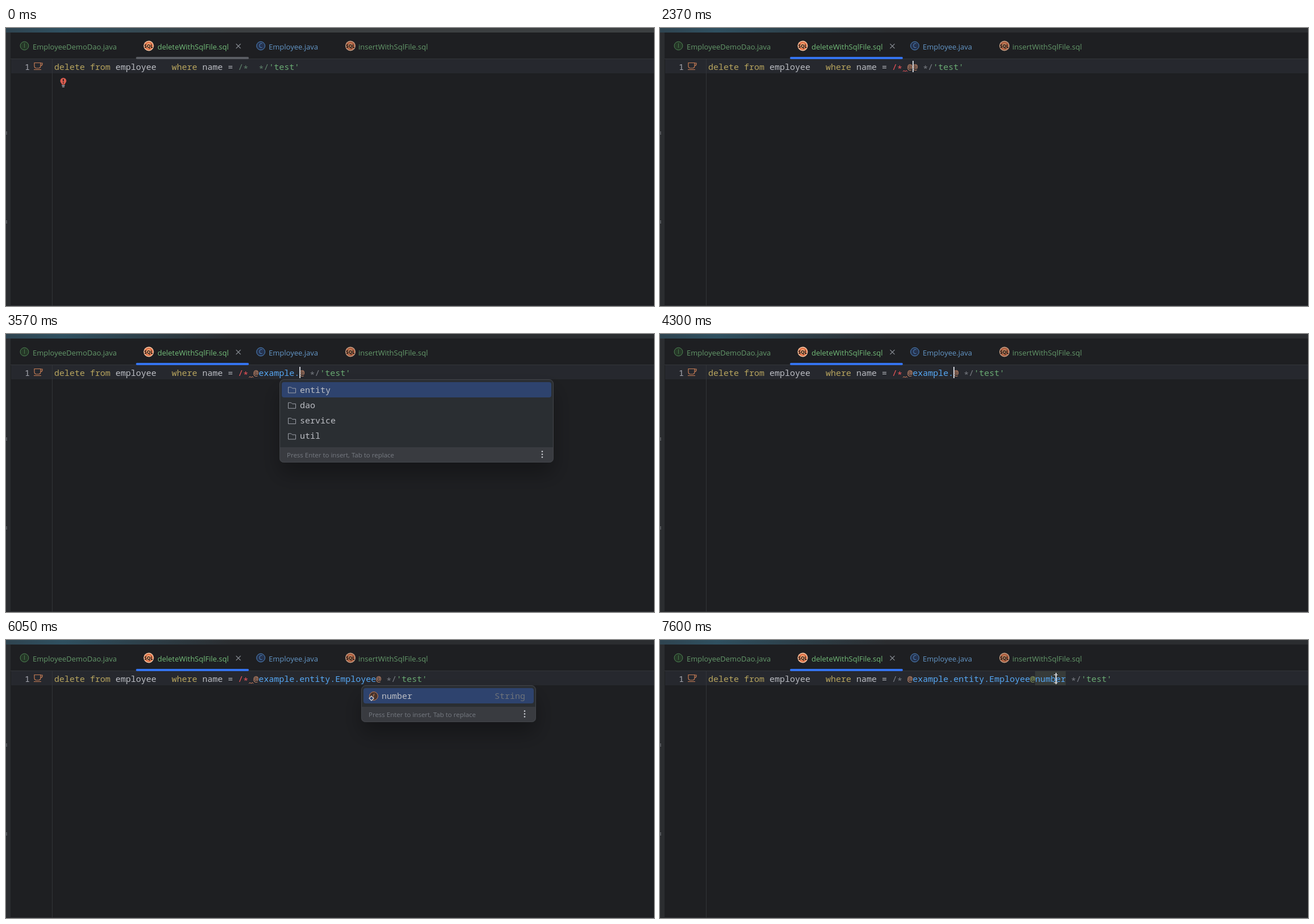
Animation of 1142 by 491 pixels, one loop 8 s. Source, as an HTML page:

```html
<!DOCTYPE html>
<html lang="en">
<head>
<meta charset="utf-8">
<style>
html, body { margin: 0; width: 100%; height: 100%; overflow: hidden; background: #1e1f22; }
svg { display: block; width: 1142px; height: 491px; }
text { white-space: pre; }
.ui { font: 13px "Open Sans", "Noto Sans", sans-serif; }
.mono { font: 15px "Noto Sans Mono", "DejaVu Sans Mono", monospace; }
.hint { font: 11.5px "Open Sans", "Noto Sans", sans-serif; }
.sql { font: bold 8px "Open Sans", "Noto Sans", sans-serif; }
.letter { font: 10px "Open Sans", "Noto Sans", sans-serif; }
</style>
</head>
<body>
<svg id="stage" viewBox="0 0 1142 491">
  <defs>
    <linearGradient id="teal">
      <stop offset="0" stop-color="#2f4450"/>
      <stop offset=".25" stop-color="#2f5060"/>
      <stop offset="1" stop-color="#2f5060" stop-opacity="0"/>
    </linearGradient>
    <filter id="shadow" x="-30%" y="-30%" width="160%" height="260%">
      <feDropShadow dx="0" dy="20" stdDeviation="18" flood-color="#000" flood-opacity=".3"/>
    </filter>
  </defs>
  <rect id="topBar" width="1142" height="8"/>
  <rect width="400" height="8" fill="url(#teal)"/>
  <rect y="8" width="8" height="483" fill="#2b2d30"/>
  <path d="M0 183.5h2M0 185.5h2M0 187.5h2M0 340.5h2M0 342.5h2M0 344.5h2" stroke="#75787e"/>
  <path d="M8 54.5h1134M8 490.5h1134" stroke="#333539"/>
  <rect x="9" y="55" width="1133" height="25" fill="#26282e"/>
  <path d="M81.5 55v435" stroke="#313438"/>
  <g id="tabs"></g>
  <rect id="underline" x="229" y="51" width="199" height="4" rx="2"/>
  <path d="M405.5 28l8 8m0-8l-8 8" stroke="#868a91" stroke-width="1.1"/>
  <text class="mono" x="33" y="74" fill="#a9abb3">1</text>
  <path d="M50 61.5h11v5.500q0 4-4 4h-3q-4 0-4-4zM61 62h3v1.500q0 3-3 3M49 73.500h13" fill="none" stroke="#c77d55" stroke-width="1.2"/>
  <g id="bulb">
    <path d="M98.5 100q0-1.6-1.5-3a5.4 5.4 0 1 1 8 0q-1.5 1.4-1.5 3z" fill="#db5c4f"/>
    <path d="M101 90v4.5M101 96v1.7" stroke="#1e1f22" stroke-width="1.7"/>
    <path d="M98.5 101.7h5M99 104h4" stroke="#ced0d6" stroke-width="1.2"/>
  </g>
  <g id="editor"></g>
  <path id="mouse" d="M-3.5-7h3l.5.5.5-.5h3M0-7V7M-3.5 7h3l.5-.5.5.5h3" fill="none" stroke="#e4e6ea"/>
</svg>
<script>
const LOOP = 8000, LEFT = 85, CHAR = 9, BODY = 39, ROW = 27.3;
const BLUE = '#56a8f5', ORANGE = '#cf8e6d', GREEN = '#6aab73', GREY = '#7a7e85', LIGHT = '#bcbec4';
const RED = '#f4555a', KEY = '#b8a55e';
const $ = id => document.getElementById(id);
const colX = col => LEFT + col * CHAR;
const span = (s, fill) => `<tspan fill="${fill}">${s}</tspan>`;
const label = (cls, x, y, fill, s, anchor = 'start') =>
  `<text class="${cls}" x="${x}" y="${y}" fill="${fill}" text-anchor="${anchor}">${s}</text>`;

function badge(x, y, letter, stroke, fill) {
  return `<circle cx="${x}" cy="${y}" r="7.4" fill="${fill}" stroke="${stroke}"/>` +
    label('letter', x, y + 3.6, stroke, letter, 'middle');
}
const classBadge = (x, y) => badge(x, y, 'C', '#5088c4', '#25324d');

function sqlBadge(x, opacity) {
  return `<g opacity="${opacity}"><circle cx="${x}" cy="31.5" r="9" fill="#f6c3a0"/>
    <circle cx="${x}" cy="31.5" r="7.3" fill="#d9693f"/>
    <circle cx="${x}" cy="31.5" r="5" fill="#f0a070"/></g>` + label('sql', x, 34.5, '#111', 'SQL', 'middle');
}

$('tabs').innerHTML =
  badge(32.5, 31.5, 'I', '#4f8554', '#253627') + label('ui', 47, 38, '#64996a', 'EmployeeDemoDao.java') +
  sqlBadge(251.5, 1) + label('ui', 267, 38, '#73bd79', 'deleteWithSqlFile.sql') +
  classBadge(449, 31.5) + label('ui', 463, 38, '#6497c8', 'Employee.java') +
  sqlBadge(607, .75) + label('ui', 621, 38, '#64996a', 'insertWithSqlFile.sql');

const icons = {
  field: (x, y) => badge(x, y, 'f', '#c77d55', '#45322b') +
    `<path d="M${x - 4} ${y}l4 4-4 4-4-4z" fill="#2e436e" stroke="#ced0d6" stroke-width="1.3"/>`,
  class: classBadge,
  package: (x, y) => `<path d="M${x - 6.5} ${y - 5}h5l2 2h6v8h-13z" fill="none" stroke="#9da0a8"/>`
};

// Completion list whose item text lines up with the caret column.
function popup({ col, right, bottom, icon, rows, type = '' }) {
  const x = colX(col) - 35, w = right - x, foot = bottom - 27;
  const items = rows.map((name, i) => {
    const y = 98.5 + i * ROW;
    return icons[icon](x + 22, y + .5) + label('mono', x + 36, y + 5, LIGHT, name) +
      label('mono', right - 19, y + 5, '#6f737a', type, 'end');
  }).join('');
  return `<g filter="url(#shadow)"><rect x="${x}" y="80" width="${w}" height="${bottom - 80}" rx="8" fill="#2b2d30"/></g>
    <rect x="${x + 4}" y="85" width="${w - 8}" height="27" rx="4" fill="#2e436e"/>${items}
    <path d="M${x} ${foot}h${w}v19q0 8-8 8h${16 - w}q-8 0-8-8z" fill="#393b40"/>
    <rect x="${x + .5}" y="80.5" width="${w - 1}" height="${bottom - 81}" rx="7.5" fill="none" stroke="#43454a"/>
    ${label('hint', x + 13, bottom - 9.5, '#777b82', 'Press Enter to insert, Tab to replace')}
    ${[-19.5, -14.5, -9.5].map(d => `<circle cx="${right - 20}" cy="${bottom + d}" r="1.3" fill="#ced0d6"/>`).join('')}`;
}

const roots = { col: 40, right: 871, bottom: 430, icon: 'package',
  rows: ['example', 'com', 'java', 'javax', 'jdk', 'META-INF', 'netscape', 'org', 'sun', 'toolkit'] };
const packages = { col: 48, right: 965, bottom: 227, icon: 'package', rows: ['entity', 'dao', 'service', 'util'] };
const entities = { col: 55, right: 965, bottom: 172, icon: 'class', rows: ['Employee', 'Project'], type: 'example.entity' };
const fields = { col: 64, right: 934, bottom: 145, icon: 'field', rows: ['number'], type: 'String' };
const full = '@example.entity.Employee@', done = full + 'number';

// caret: offset in the comment body; mark: highlighted range of the body
const scenes = [
  { t: 0, body: '' },
  { t: 1020, body: '', caret: 0 },
  { t: 1830, body: '@', caret: 1, plain: 1 },
  { t: 1970, body: '@@', caret: 2, plain: 1 },
  { t: 2300, body: '@@', caret: 1, plain: 1 },
  { t: 2370, body: '@@', caret: 1, error: 1 },
  { t: 2640, body: '@@', caret: 1, error: 1, list: roots },
  { t: 3040, body: '@@', error: 1, list: roots },
  { t: 3240, body: '@example@', caret: 8, error: 1 },
  { t: 3510, body: '@example.@', caret: 9, error: 1 },
  { t: 3570, body: '@example.@', caret: 9, error: 1, list: packages },
  { t: 4300, body: '@example.@', caret: 9, error: 1 },
  { t: 4370, body: '@example.entity@', caret: 15, error: 1 },
  { t: 4510, body: '@example.entity.@', caret: 16, error: 1 },
  { t: 4580, body: '@example.entity.@', caret: 16, error: 1, list: entities },
  { t: 5180, body: full, caret: 24, error: 1, mark: [1, 24] },
  { t: 5450, body: full, caret: 25, error: 1 },
  { t: 5850, body: full, caret: 25, error: 1, list: fields },
  { t: 6050, body: full, error: 1, list: fields },
  { t: 6450, body: done, caret: 31, error: 1, mark: [25, 31] },
  { t: 6780, body: done, caret: 31, mark: [25, 31] },
  { t: 7530, body: done, caret: 29, mark: [25, 31] }
];

// Asterisks sit at mid-height, as coding fonts draw them.
const star = '<tspan dy="3">*</tspan>', back = s => `<tspan dy="-3">${s}</tspan>`;

function editor({ body, caret, plain, error, mark, list }) {
  const comment = body ? GREY : '#5f826b';
  const tokens = body.split(/(@)/).map((s, i) =>
    span(s, plain ? comment : s !== '@' ? BLUE : !error && i > 1 ? '#8fa35f' : ORANGE)).join('');
  let out = '';
  if (mark) out += `<rect x="${colX(BODY + mark[0])}" y="55" width="${(mark[1] - mark[0]) * CHAR}" height="25" fill="#373b39"/>`;
  out += `<text class="mono" x="${LEFT}" y="74">` + span('delete from', KEY) + span(' employee   ', LIGHT) +
    span('where', KEY) + span(' name = ', LIGHT) + span('/' + star + back(' '), error ? RED : comment) + tokens +
    span(' ' + star + back('/'), comment) + span("'test'", GREEN) + '</text>';
  if (error) out += `<path d="M428 77l2-2 2 2 2-2 2 2" fill="none" stroke="${body === '@@' ? RED : '#d9825f'}"/>`;
  if (caret !== undefined) out += `<rect x="${colX(BODY + caret)}" y="58" width="2" height="20" fill="#ced0d6"/>`;
  return out + (list ? popup(list) : '');
}

// Pointer legs: visible from `start` to `hide`, moving until `end`.
const rest = [568.5, 178.5], click = [436.5, 70.5];
const legs = [
  { start: 130, end: 870, hide: 1020, from: [736.5, 290.5], to: click },
  { start: 1020, end: 1360, hide: 1830, from: click, to: rest },
  { start: 3240, end: 3510, hide: 3510, from: rest, to: rest },
  { start: 6780, end: 7330, hide: LOOP, from: rest, to: [697.5, 68.5] }
];
const ease = p => p * p * (3 - 2 * p);

let shown;
function draw(now) {
  const t = now % LOOP;
  const scene = scenes.findLast(s => s.t <= t);
  if (scene !== shown) {
    shown = scene;
    const focused = scene.t > 0;
    $('topBar').setAttribute('fill', focused ? '#2b2d30' : '#3c3f41');
    $('underline').setAttribute('fill', focused ? '#3574f0' : '#5a5d63');
    $('bulb').style.display = focused ? 'none' : '';
    $('editor').innerHTML = editor(scene);
  }
  const leg = legs.find(l => t >= l.start && t < l.hide);
  $('mouse').style.display = leg ? '' : 'none';
  if (leg) {
    const p = ease(Math.min(1, (t - leg.start) / (leg.end - leg.start)));
    const [x, y] = leg.from.map((a, i) => a + (leg.to[i] - a) * p);
    $('mouse').setAttribute('transform', `translate(${x} ${y})`);
  }
}
const begin = performance.now();
function tick() {
  draw(performance.now() - begin);
  requestAnimationFrame(tick);
}
tick();
</script>
</body>
</html>
```
